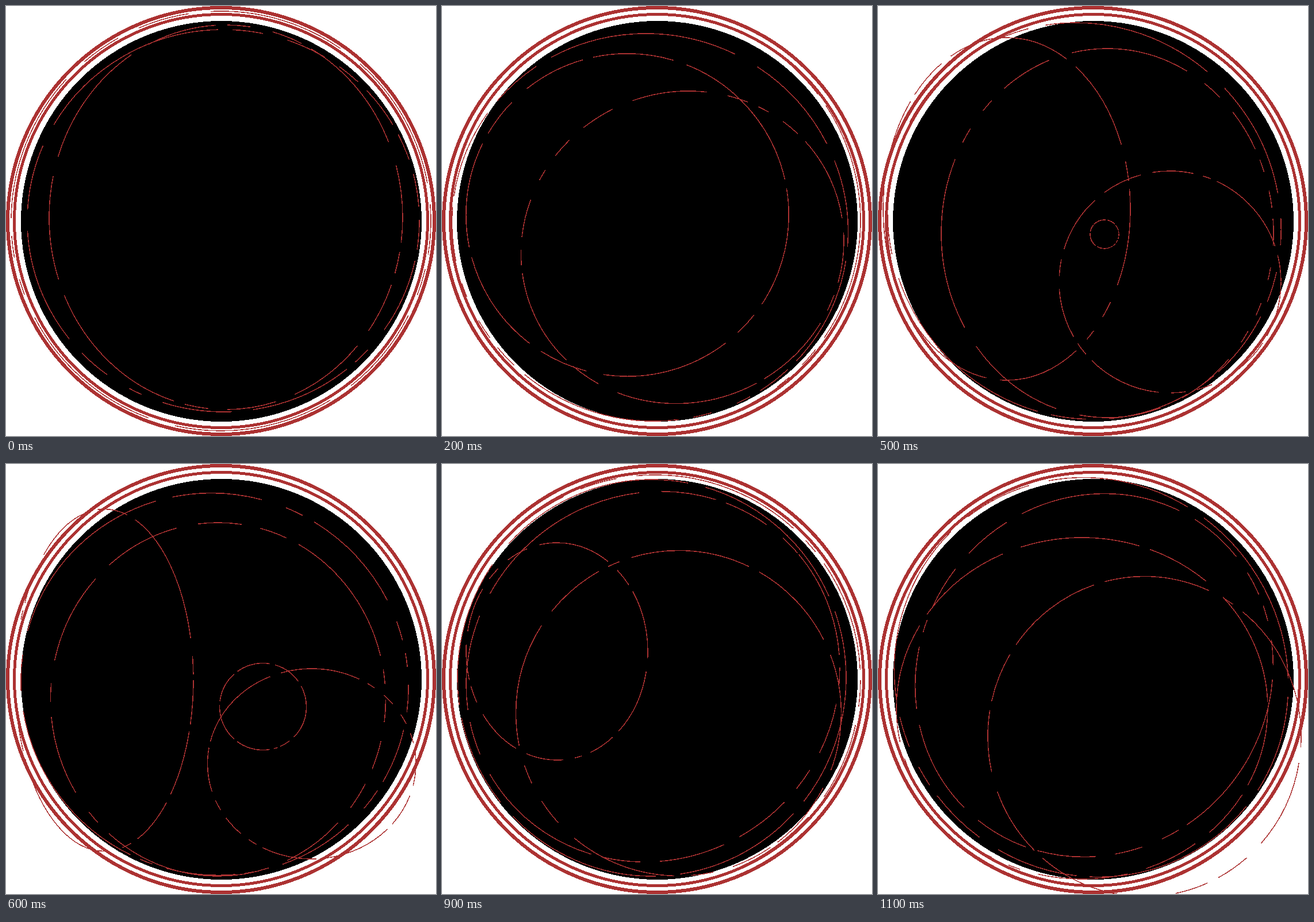
These frames come from a looping animation (748x748 px, 1.2 s). An HTML page:

```html
<!DOCTYPE html>
<html lang="en">
<head>
<meta charset="utf-8">
<title>Drifting rings</title>
<style>
html, body { margin: 0; width: 100%; height: 100%; overflow: hidden; background: #fff; }
svg { display: block; fill: none; stroke: #ac3232; stroke-width: 1.5; shape-rendering: crispEdges; }
</style>
</head>
<body>
<svg width="748" height="748" viewBox="0 0 748 748">
  <circle cx="374.5" cy="374.5" r="348.5" fill="#000" stroke="none"/>
  <circle cx="374" cy="374" r="371" stroke-width="6" style="stroke-width: 6"/>
  <circle cx="374" cy="374" r="359.5" style="stroke-width: 5"/>
  <g id="rings"></g>
</svg>
<script>
const STEP = 100, STEPS = 12;
const group = document.getElementById('rings');
const tracks = [];

// A track is one drifting ring; it exists between its first and last key.
const key = (step, cx, cy, rx, ry = rx, tilt = 0) => ({ step, cx, cy, rx, ry, tilt });
function track(...keys) {
  const node = document.createElementNS('http://www.w3.org/2000/svg', 'ellipse');
  node.setAttribute('pathLength', 360);
  group.append(node);
  tracks.push({ node, keys });
}

// Slides left and leaves as a narrow ellipse.
track(key(0, 382.5, 367.5, 307.5, 334.5), key(1, 367, 361, 286.5), key(3, 278, 366, 275),
  key(5, 224, 353, 215, 298), key(7, 118, 399, 95, 297));
// Shrinks towards the lower right.
track(key(0, 378, 373.5, 341, 332.5), key(1, 373, 396, 312, 284, -50), key(3, 463.5, 443.5, 254.5),
  key(5, 508, 480, 193), key(7, 555.5, 563, 169.5, 138));
// Two that grow out of the middle.
track(key(5, 394, 397, 25), key(7, 500, 447, 126), key(9, 411.5, 433.5, 283), key(11, 463.5, 474, 272.5, 278.5));
track(key(7, 327, 346, 22.5), key(9, 200, 326, 158, 189), key(11, 355, 425, 323, 297));
// Wide ones that wobble inside the rim.
track(key(1, 366, 385, 342, 321, 45), key(3, 358, 385, 350), key(5, 399, 395, 289, 321),
  key(7, 339, 424, 294), key(9, 367, 370, 331, 316, -40), key(11, 376, 367.5, 323, 304, -52));
track(key(0, 374, 374, 365), key(1, 370, 372, 350, 356), key(3, 372, 374, 364), key(5, 359, 374, 351, 336, 50),
  key(7, 367, 392, 326), key(9, 365, 372, 338, 345), key(11, 371, 371, 352, 338, 55));
track(key(7, 372, 385, 332, 316));
track(key(7, 378, 377, 352), key(9, 371, 376, 357));

function randomFrom(seed) {
  return () => {
    seed = (seed + 0x6d2b79f5) | 0;
    let t = Math.imul(seed ^ (seed >>> 15), seed | 1);
    t ^= t + Math.imul(t ^ (t >>> 7), t | 61);
    return ((t ^ (t >>> 14)) >>> 0) / 2 ** 32;
  };
}

// Strokes and gaps in degrees, once around the ring.
function dashes(seed) {
  const random = randomFrom(seed), list = [];
  for (let turn = 0; turn < 360;) {
    const stroke = 4 + 55 * random() ** 2, gap = 3 + 5 * random();
    list.push(stroke, gap);
    turn += stroke + gap;
  }
  return list.join(' ');
}

function poseAt(keys, step) {
  const a = keys.findLast(k => k.step <= step), b = keys.find(k => k.step >= step);
  if (!a || !b) return null;
  const part = a === b ? 0 : (step - a.step) / (b.step - a.step);
  const mix = name => a[name] + (b[name] - a[name]) * part;
  return { cx: mix('cx'), cy: mix('cy'), rx: mix('rx'), ry: mix('ry'), tilt: mix('tilt') };
}

function draw(step) {
  tracks.forEach(({ node, keys }, i) => {
    const pose = poseAt(keys, step);
    node.style.display = pose ? '' : 'none';
    if (!pose) return;
    const { tilt, ...shape } = pose;
    for (const name in shape) node.setAttribute(name, shape[name]);
    node.setAttribute('transform', `rotate(${tilt} ${pose.cx} ${pose.cy})`);
    node.setAttribute('stroke-dasharray', dashes(i * STEPS + step));
  });
}

let shown = -1;
function tick() {
  const step = Math.floor(performance.now() / STEP) % STEPS;
  if (step !== shown) draw(shown = step);
  requestAnimationFrame(tick);
}
tick();
</script>
</body>
</html>
```
